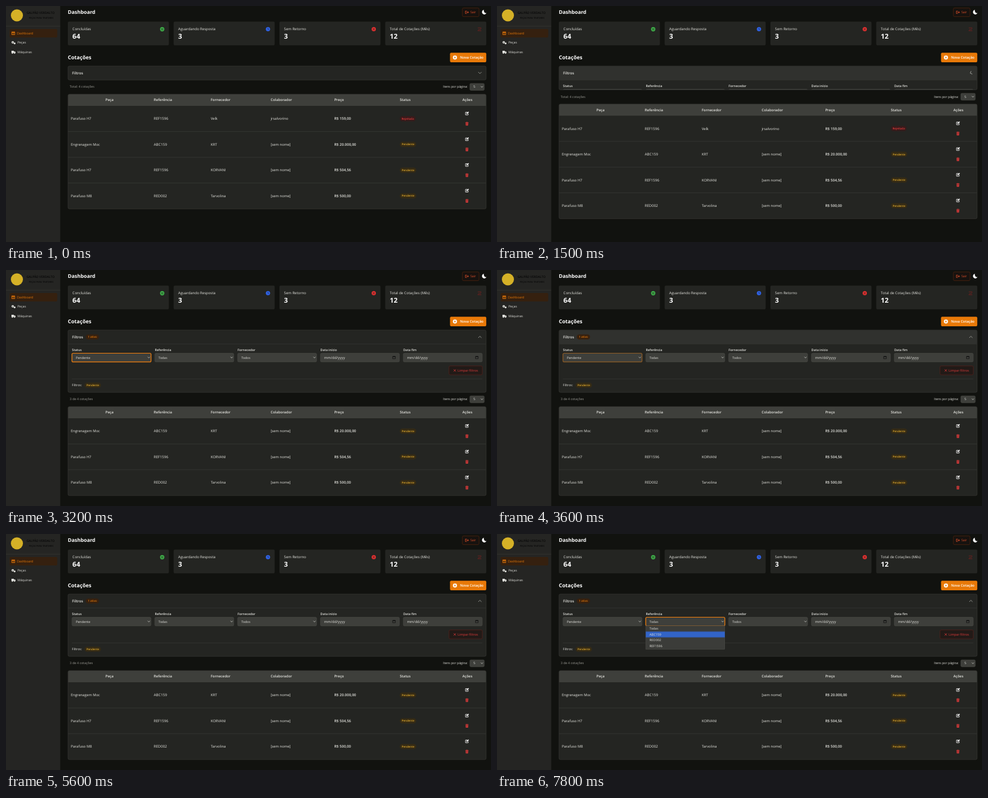
These frames come from a looping animation (800 by 390 pixels, 8000 ms). An HTML page:

```html
<!DOCTYPE html>
<html lang="pt-BR">
<head>
<meta charset="utf-8">
<title>Dashboard</title>
<style>
@property --open { syntax: '<number>'; inherits: true; initial-value: 0; }
@property --on { syntax: '<number>'; inherits: true; initial-value: 0; }
@property --hover { syntax: '<number>'; inherits: true; initial-value: 0; }
@property --ring1 { syntax: '<number>'; inherits: true; initial-value: 0; }
@property --ring2 { syntax: '<number>'; inherits: true; initial-value: 0; }

html, body { margin: 0; width: 100%; height: 100%; overflow: hidden; background: #11120f; }
svg {
  display: block; width: 100vw; height: 100vh;
  font-family: 'Open Sans', 'Noto Sans', sans-serif;
  fill: #e4e4df; text-rendering: geometricPrecision;
  --drop: calc(var(--open) * (43px + var(--on) * 37px));
  animation: open 8s ease-in-out infinite, on 8s step-end infinite,
    hover 8s linear infinite, ring1 8s linear infinite, ring2 8s linear infinite;
}
.b { font-weight: 700; fill: #fff; }
.m { font-weight: 600; }
.dim { fill: #9c9c96; }
.mid { text-anchor: middle; }
.line { fill: none; stroke: currentColor; stroke-width: .8; stroke-linecap: round; stroke-linejoin: round; }
.card { fill: #242522; }
.edge { stroke: #3b3c38; stroke-width: .6; }
.field { fill: #3e3f3b; stroke: #4d4e49; stroke-width: .5; }

.on { opacity: var(--on); }
.off { opacity: calc(1 - var(--on)); }
.panel { height: calc(23px + var(--drop)); }
.low { transform: translateY(var(--drop)); }
.table { height: calc(189.5px - var(--on) * 42.5px); }
.rows { transform: translateY(calc(var(--on) * -42.5px)); }
.head { opacity: var(--hover); }
.fold { opacity: min(1, var(--open) * 8); }
.chevron { transform: translate(781.7px, 110.6px) rotate(calc(var(--open) * 180deg)); }
.ring { fill: none; stroke: #ef7d0c; stroke-width: 1.2; }
.r1 { opacity: var(--ring1); }
.r2 { opacity: var(--ring2); }

.pop1 { animation: pop1 8s step-end infinite; }
.pop2 { animation: pop2 8s step-end infinite; }
.mark1 { animation: mark1 8s step-end infinite; }
.mark2 { animation: mark2 8s step-end infinite; }

@keyframes open {
  0%, 16.9% { --open: 0; }
  21.25%, 45.3% { --open: 1; }
  49.3%, 60.5% { --open: 0; }
  64.8%, 100% { --open: 1; }
}
@keyframes on { 0% { --on: 0; } 38.75%, 100% { --on: 1; } }
@keyframes hover {
  0%, 9.8% { --hover: 0; }
  12%, 24.3% { --hover: 1; }
  26.2%, 42.5% { --hover: 0; }
  44.5%, 68% { --hover: 1; }
  70%, 100% { --hover: 0; }
}
@keyframes ring1 {
  0%, 28.8% { --ring1: 0; }
  31.2%, 43.8% { --ring1: 1; }
  46%, 100% { --ring1: 0; }
}
@keyframes ring2 { 0%, 73.75% { --ring2: 0; } 76.25%, 100% { --ring2: 1; } }
@keyframes pop1 { 0% { opacity: 0; } 28.75% { opacity: 1; } 38.75%, 100% { opacity: 0; } }
@keyframes pop2 { 0% { opacity: 0; } 73.75%, 100% { opacity: 1; } }
@keyframes mark1 { 0% { transform: none; } 32.5%, 100% { transform: translateY(9.6px); } }
@keyframes mark2 { 0% { transform: none; } 90%, 100% { transform: translateY(9.6px); } }
</style>
</head>
<body>
<svg id="stage" viewBox="0 0 800 390"></svg>
<script>
// y is the middle of the capitals
const text = (x, y, size, str, cls = '', fill = '') =>
  `<text x="${x}" y="${(y + size * .36).toFixed(2)}" font-size="${size}" class="${cls}"${fill && ` style="fill:${fill}"`}>${str}</text>`;
const rect = (x, y, w, h, r, attrs) => `<rect x="${x}" y="${y}" width="${w}" height="${h}" rx="${r}" ${attrs}/>`;
const at = (x, y, body, color = '#e4e4df') => `<g transform="translate(${x} ${y})" style="color:${color}" fill="${color}">${body}</g>`;
const line = d => `<path class="line" d="${d}"/>`;
const dot = (r, fill) => `<circle r="${r}" ${fill ? `fill="${fill}"` : ''}/>`;
const arrow = (x, y) => at(x, y, line('M-1.5 -.8L0 .8L1.5 -.8'), '#c9c9c4');

const ORANGE = '#e87908', RED = '#e23b3b', YELLOW = '#dfa92d';

const chip = (x, y, str, w, color, back) =>
  rect(x, y - 4.2, w, 8.4, 4.2, `fill="${back}"`) + text(x + w / 2, y, 4.5, str, 'm mid', color);
const pending = (x, y) => chip(x, y, 'Pendente', 27, YELLOW, '#352b15');

const icons = {
  grid: '<path d="M-2.8 -2.5h5.6v5.2h-5.6z"/><path fill="#35200f" d="M-2 -.7h1.6v2.5h-1.6zM.4 -.7h1.6v2.5h-1.6z"/>',
  cogs: '<circle cx="-1.2" cy="-.4" r="2"/><circle cx="1.9" cy="1.3" r="1.5"/><circle cx="-1.2" cy="-.4" r=".7" fill="#252523"/>',
  truck: '<path d="M-3.3 -2.3h4v3.9h-4zM1 -1.2h1.4l1 1.3v1.5h-2.4z"/><circle cx="-1.8" cy="1.8" r="1"/><circle cx="1.9" cy="1.8" r="1"/>',
  edit: line('M.3 -2H-2.3V2.5H2V.4') + '<path d="M-.9 1.1l.3-1.5 2.7-2.7 1.2 1.2-2.7 2.7z"/>',
  trash: '<path d="M-2.6 -2.6h1.6l.4-.5h1.2l.4.5h1.6v.8h-5.2zM-2.2 -1.4h4.4l-.3 4.3h-3.8z"/>' +
    '<path d="M-.8 -.6v2.6M.8 -.6v2.6" stroke="#242522" stroke-width=".4"/>',
  exit: line('M-.8 -2H-2.5V2H-.8M-.8 0H2.4M1.1 -1.5L2.5 0L1.1 1.5'),
  calendar: line('M-2 -1.7h4v3.8h-4z') + '<path d="M-2 -2.2h4v1.3h-4z"/>'
};

const sidebar = () =>
  rect(0, 0, 89.5, 390, 0, 'fill="#252523"') +
  '<path d="M0 33.3H89.5" stroke="#393a36" stroke-width=".6"/>' +
  at(18, 15.5, dot(10), '#d5b127') +
  text(57, 11.3, 5, 'GALPÃO VERDALTO', 'mid m', '#080808') +
  text(58, 20, 3.7, 'PEÇAS PARA TRATORES', 'mid m', '#090909') +
  rect(6, 38, 78.5, 14, 2, 'fill="#35200f"') +
  at(12, 45, icons.grid, ORANGE) + text(18, 45, 5.2, 'Dashboard', '', ORANGE) +
  at(12.3, 60.5, icons.cogs) + text(19, 60.5, 5.2, 'Peças') +
  at(12.3, 76.2, icons.truck) + text(19, 76.2, 5.2, 'Máquinas');

const topBar = () =>
  text(102, 10.4, 8.4, 'Dashboard', 'b') +
  rect(752.8, 3.2, 27.4, 14.4, 2, 'fill="#17120f" stroke="#57260f" stroke-width=".7"') +
  at(760.3, 10.4, icons.exit, '#e0512b') + text(766, 10.4, 5.2, 'Sair', '', '#e0512b') +
  '<path fill="#fff" d="M788.3 6.2A3.9 3.9 0 1 0 792.6 11.6A4 4 0 0 1 788.3 6.2z"/>';

const dark = d => `<path d="${d}" fill="none" stroke="#20211e" stroke-width=".7"/>`;
const cards = () => [
  ['Concluídas', 64, dot(3.6) + dark('M-2 -.6h4M-1.6 .8Q0 2 1.6 .8'), '#3fae49'],
  ['Aguardando Resposta', 3, dot(3.5) + dark('M0 -2V0L1.5 .9'), '#2f62e6'],
  ['Sem Retorno', 3, dot(3.5) + dark('M-1.3 -1.2L1.3 1.2M1.3 -1.2L-1.3 1.2'), '#dd3030'],
  ['Total de Cotações (Mês)', 12, line('M-2.5 -2.2H2.5M-2.5 2.2L-.8 0L.7 1L2.5 -1M-2.5 2.6H2.6'), '#79201f']
].map(([label, count, icon, color], i) => {
  const x = 102 + i * 174.5;
  return rect(x, 25.7, 166.7, 39.4, 2, 'class="card"') + text(x + 7.6, 38.3, 6, label) +
    text(x + 7.6, 49.8, 11.2, count, 'b') + at(x + 155.6, 38.3, icon, color);
}).join('');

const title = () =>
  text(102, 84.7, 8.6, 'Cotações', 'b') +
  rect(732.4, 77.2, 59.8, 15.8, 2, `fill="${ORANGE}"`) +
  at(740.5, 85.1, dot(3.4) + `<path d="M-1.7 0H1.7M0 -1.7V1.7" stroke="${ORANGE}" stroke-width=".9"/>`, '#fff') +
  text(749, 85.1, 5.8, 'Nova Cotação', 'm', '#fff');

const fields = () => ['Status', 'Referência', 'Fornecedor', 'Data início', 'Data fim'].map((label, i) => {
  const x = 108.8 + i * 136.6, y = 144.6;
  const value = i
    ? text(x + 6.2, y, i > 2 ? 5.9 : 5.3, ['', 'Todas', 'Todos', 'mm/dd/yyyy', 'mm/dd/yyyy'][i])
    : text(x + 6.4, y, 5.3, 'Todos os status', 'off') + text(x + 6.4, y, 5.3, 'Pendente', 'on');
  return text(x, 131.6, 5.3, label, 'm') + rect(x, 137.5, 130.4, 14.4, 2, 'class="field"') + value +
    (i > 2 ? at(x + 121.6, y, icons.calendar, '#111') : arrow(x + 126.8, y)) +
    (i < 2 ? rect(x, 137.5, 130.4, 14.4, 2, `class="ring r${i + 1}"`) : '');
}).join('');

const filters = () =>
  rect(102.2, 99.2, 689.8, 23, 2.5, 'class="card edge panel"') +
  rect(102.5, 99.5, 689.2, 22.4, 2.2, 'class="head" fill="#30312e"') +
  text(109, 110.6, 6.1, 'Filtros', 'm') +
  `<g class="on">${chip(131.5, 110.6, '1 ativo', 22, ORANGE, '#37210f')}</g>` +
  `<g class="chevron" style="color:#a9a9a3">${line('M-2.4 -1.2L0 1.2L2.4 -1.2')}</g>` +
  '<g clip-path="url(#fold)"><path class="fold" d="M102.5 122.2H791.7" stroke="#3b3c38" stroke-width=".6"/>' + fields() +
  '<g class="on">' +
  rect(730.8, 158.6, 54.8, 14.6, 2, 'fill="#221a17" stroke="#61231b" stroke-width=".6"') +
  at(740.3, 166, line('M-1.5 -1.5L1.5 1.5M1.5 -1.5L-1.5 1.5'), RED) + text(745, 166, 5.4, 'Limpar filtros', '', RED) +
  '<path d="M108.8 180H785.6" stroke="#3b3c38" stroke-width=".6"/>' +
  text(108.8, 190.4, 5.3, 'Filtros:') + pending(129.6, 190.4) + '</g></g>';

const row = ([part, code, maker, user, price], i) => {
  const y = 186.2 + i * 42.5;
  return `<g${i ? '' : ' class="off"'}>` +
    text(107, y, 5.9, part) + text(243.8, y, 6, code) + text(337.7, y, 5.9, maker) +
    text(436.5, y, 5.9, user) + text(541.5, y, 6, price, 'm') +
    (i ? pending(649.6, y + .1) : chip(649.6, y, 'Rejeitada', 26, RED, '#381b1b')) +
    at(760.3, y - 8.7, icons.edit, '#fff') + at(760.3, y + 8.4, icons.trash, RED) +
    (i < 3 ? `<path d="M102.5 ${y + 21.3}H791.7" stroke="#3d3e3a" stroke-width=".6"/>` : '') + '</g>';
};

const table = () =>
  '<g class="low">' + text(105, 133.4, 5.3, 'Total: 4 cotações', 'dim off') + text(105, 133.4, 5.3, '3 de 4 cotações', 'dim on') +
  text(721, 133.4, 5.2, 'Itens por página:') + rect(765, 128, 24, 11.4, 1.8, 'class="field"') +
  text(771, 133.6, 5.2, '5') + arrow(785, 133.6) +
  rect(102.2, 145.8, 689.8, 189.5, 2.5, 'class="card edge table"') +
  '<path d="M102.5 165V148.2q0-2.2 2.2-2.2H789.5q2.2 0 2.2 2.2V165z" fill="#3e3f3b"/>' +
  ['Referência', 'Fornecedor', 'Colaborador', 'Preço', 'Status']
    .map((s, i) => text([243.8, 337.7, 436.5, 541.5, 649.5][i], 155.3, 5.9, s, 'm')).join('') +
  text(170.7, 155.3, 5.9, 'Peça', 'm mid') + text(761, 155.3, 5.9, 'Ações', 'm mid') +
  '<g class="rows">' + [
    ['Parafuso H7', 'REF1596', 'Velk', 'jrsalvorino', 'R$ 159,00'],
    ['Engrenagem Moc', 'ABC159', 'KRT', '[sem nome]', 'R$ 20.000,00'],
    ['Parafuso H7', 'REF1596', 'KORVANI', '[sem nome]', 'R$ 504,56'],
    ['Parafuso M8', 'RED002', 'Tarvolina', '[sem nome]', 'R$ 500,00']
  ].map(row).join('') + '</g></g>';

const popup = (n, x, items) =>
  `<g class="pop${n}">` + rect(x, 151.6, 130.4, 39, 0, 'fill="#3b3c39" stroke="#555651" stroke-width=".4"') +
  rect(x, 151.6, 130.4, 9.6, 0, `class="mark${n}" fill="#3264c8"`) +
  items.map((s, i) => text(x + 6.2, 156.3 + i * 9.6, 5.3, s)).join('') + '</g>';

document.getElementById('stage').innerHTML =
  '<clipPath id="fold"><rect class="panel" x="102" y="99" width="690.5" height="23"/></clipPath>' +
  sidebar() + topBar() + cards() + title() + filters() + table() +
  popup(1, 108.8, ['Todos os status', 'Pendente', 'Aprovada', 'Rejeitada']) +
  popup(2, 245.4, ['Todas', 'ABC159', 'RED002', 'REF1596']);
</script>
</body>
</html>
```
